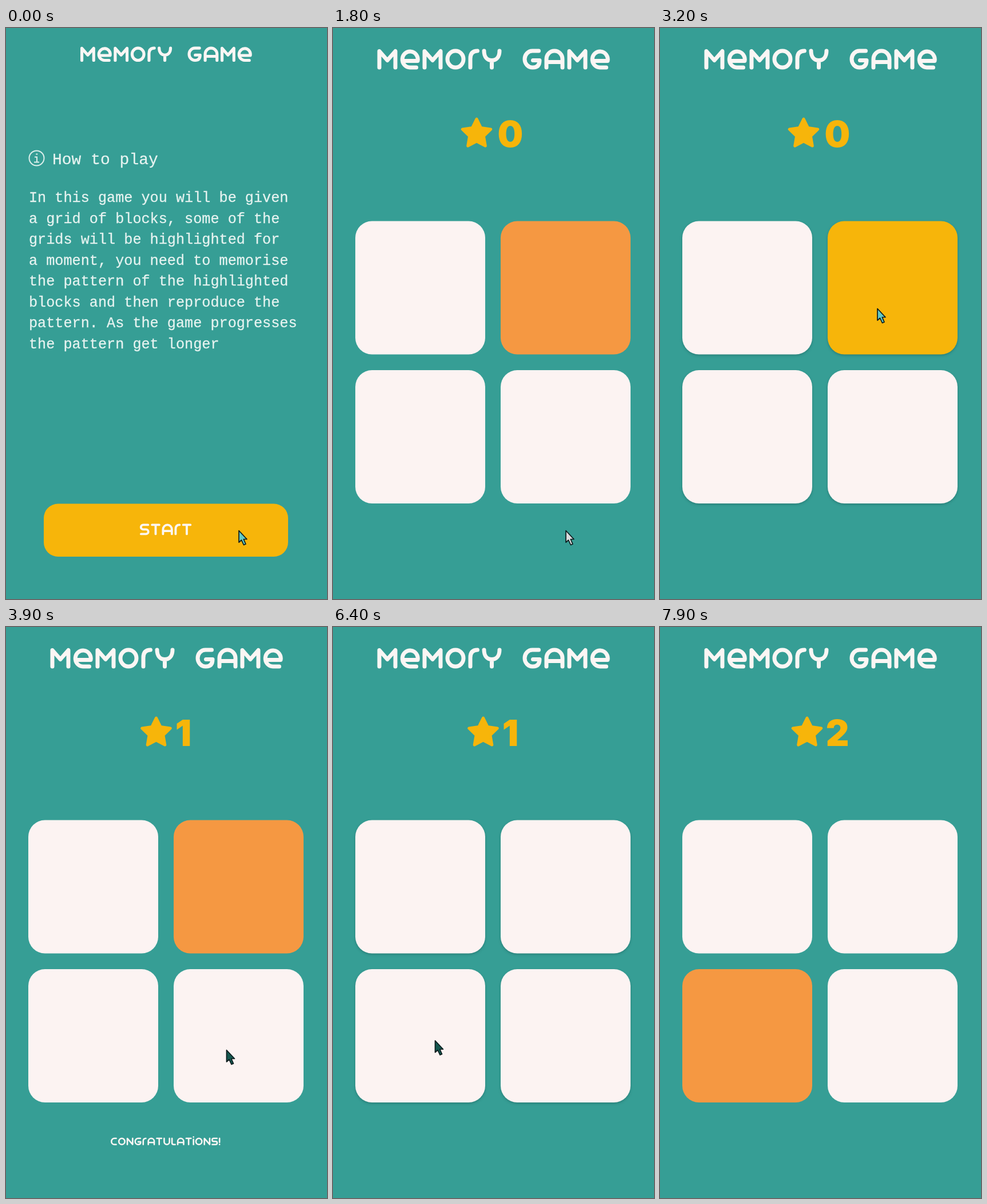
Write an HTML page that moves like this. It is 561x998 px and loops after 8000 ms.

```html
<!DOCTYPE html>
<html lang="en">
<head>
<meta charset="utf-8">
<title>Memory game</title>
<style>
html, body { margin: 0; height: 100%; overflow: hidden; background: #369e95; }
svg { display: block; width: 100%; height: 100%; }
.letters { fill: none; stroke: #fbf6f4; stroke-width: 7; stroke-linecap: round; stroke-linejoin: round; }
.mono { font-family: "Liberation Mono", monospace; fill: #e6f3f0; stroke: #e6f3f0; stroke-width: .3; white-space: pre; }
#score { font: 900 63px Inter, sans-serif; text-anchor: middle; }
.gold { fill: #f7b50a; stroke: #f7b50a; stroke-linejoin: round; }
</style>
</head>
<body>
<svg viewBox="0 0 561 998" preserveAspectRatio="none">
  <g id="intro">
    <g fill="none" stroke="#dcefeb" stroke-width="2">
      <circle cx="53.5" cy="227.5" r="13"/>
      <path d="M50 225.5h4v9M49 234.5h9M52.3 220.5h3"/>
    </g>
    <text class="mono" x="81" y="238" font-size="28">How to play</text>
    <g id="rules" class="mono" font-size="25.2"></g>
    <rect x="66" y="831.5" width="427" height="92.5" rx="25" fill="#f7b50a"/>
  </g>
  <g id="game">
    <path id="star" class="gold" stroke-width="5"/>
    <text id="score" class="gold" x="310" y="207.5" stroke-width="0"></text>
    <g id="tiles"></g>
  </g>
  <path id="cursor" d="M1 1V21.5L5.5 17.5L9.5 26L13 24.5L9.3 16H15Z" stroke="#0c1b1d" stroke-width="1.7" stroke-linejoin="round"/>
</svg>
<script>
const LOOP = 8000;
const $ = id => document.getElementById(id);
function add(parent, tag, attrs) {
  const el = document.createElementNS('http://www.w3.org/2000/svg', tag);
  for (const k in attrs) el.setAttribute(k, attrs[k]);
  return parent.appendChild(el);
}

// Rounded display lettering: [width, stroke path], 36 units high
const glyphs = {
  M: [35, 'M3.5 32.5V4L17.5 20L31.5 4V32.5'],
  E: [34, 'M4 21H30.5A13.5 14 0 1 0 17 32.5H28'],
  O: [35, 'M17.5 3.5A14 14.5 0 1 0 17.5 32.5A14 14.5 0 1 0 17.5 3.5'],
  R: [19, 'M3.5 32.5V17Q3.5 3.5 16 3.5'],
  Y: [34, 'M3.5 3.5C3.5 14 9 20 17 20S30.5 14 30.5 3.5M17 20V32.5'],
  G: [33, 'M28 3.5H17A13.5 14.5 0 0 0 17 32.5H18Q29.5 32.5 29.5 20H18'],
  A: [35, 'M3.5 32.5V18A14 14.5 0 0 1 31.5 18V32.5M3.5 23H31.5'],
  S: [30, 'M26 3.5H10.5A7.2 7.2 0 0 0 10.5 18H19.5A7.2 7.2 0 0 1 19.5 32.5H3.5'],
  T: [30, 'M3.5 3.5H26.5M15 3.5V32.5'],
  C: [30, 'M26 3.5H17A13.5 14.5 0 0 0 17 32.5H26'],
  N: [32, 'M3.5 32.5V4L28.5 32V3.5'],
  U: [32, 'M3.5 3.5V20A12.5 12.5 0 0 0 28.5 20V3.5'],
  L: [22, 'M3.5 3.5V25Q3.5 32.5 11 32.5H18.5'],
  I: [6, 'M3 8V32.5M3 -3V-2.5'],
  '!': [6, 'M3 3.5V22M3 32V32.5'],
  ' ': [27, '']
};
function lettering(parent, word, x, y, scale) {
  const g = add(parent, 'g', { class: 'letters', role: 'img', 'aria-label': word,
    transform: `translate(${x} ${y}) scale(${scale})` });
  let pen = 0;
  for (const ch of word.toUpperCase()) {
    const [width, d] = glyphs[ch];
    add(g, 'path', { d, transform: `translate(${pen})` });
    pen += width + 5;
  }
  return g;
}
lettering($('intro'), 'Memory Game', 130, 32.5, .738);
lettering($('intro'), 'Start', 234, 866.5, .55);
lettering($('game'), 'Memory Game', 77.5, 36.5, 1);
const praise = lettering($('game'), 'Congratulations!', 183, 892.5, .37);

['In this game you will be given', 'a grid of blocks, some of the', 'grids will be highlighted for',
 'a moment, you need to memorise', 'the pattern of the highlighted', 'blocks and then reproduce the',
 'pattern. As the game progresses', 'the pattern get longer'].forEach((line, i) => {
  add($('rules'), 'text', { x: 40, y: 304 + i * 36.5 }).textContent = line;
});

$('star').setAttribute('d', 'M' + Array.from({ length: 10 }, (_, i) => {
  const r = i % 2 ? 13 : 26, a = i * Math.PI / 5;
  return `${r * Math.sin(a)} ${-r * Math.cos(a)}`;
}).join('L') + 'Z');

const tiles = [0, 1, 2, 3].map(i => add($('tiles'), 'rect', {
  x: 39 + i % 2 * 254, y: 337.5 + (i >> 1) * 260.5, width: 227, height: 233, rx: 29 }));

// Times are [on, off]
const enabled = [[500, 1400], [2350, 3450], [5200, 6700]];
const flashes = { 1: [[1500, 2350], [3620, 4200], [6750, 7350]], 2: [[4600, 5200], [7600, 9000]] };
const taps = { 1: [[2950, 3300], [5950, 6150]], 2: [[6580, 6750]] };
const praises = [[3600, 4450], [6800, 7500]];
const presses = [[0, 500], [3000, 3350], [5950, 6150], [6600, 6850]];
// time, x, y of the pointer tip
const path = [[0, 406, 877.5], [2700, 406, 877.5], [3000, 379, 489.5], [3300, 379, 489.5],
  [3500, 384.5, 738.5], [5700, 384.5, 738.5], [5950, 379, 489.5], [6130, 379, 489.5],
  [6380, 177.5, 722], [6850, 177.5, 722], [7300, 190, 1010], [LOOP, 190, 1010]];

const clamp = v => Math.min(1, Math.max(0, v));
const level = (t, spans = []) =>
  spans.reduce((sum, [on, off]) => sum + clamp((t - on) / 200) - clamp((t - off) / 200), 0);
const mix = (a, b, k) => a.map((v, i) => v + (b[i] - v) * k);
const WHITE = [252, 243, 242], YELLOW = [247, 181, 10], ORANGE = [245, 152, 66];

function pointerAt(t) {
  const i = path.findIndex(p => p[0] > t), a = path[i - 1], b = path[i];
  const k = (t - a[0]) / (b[0] - a[0]);
  return mix(a, b, k * k * (3 - 2 * k)).slice(1);
}
function pointerColor(t) {
  if (presses.some(([on, off]) => t >= on && t < off)) return '#62c9c5';
  return t < 2700 ? '#d9dbdc' : '#15574f';
}

function draw(t) {
  const playing = t >= 500;
  $('intro').style.display = playing ? 'none' : '';
  $('game').style.display = playing ? '' : 'none';

  const points = t < 3600 ? 0 : t < 6800 ? 1 : 2;
  $('score').textContent = points;
  $('star').setAttribute('transform', `translate(${[251, 262.5, 257][points]} 185)`);

  tiles.forEach((tile, i) => {
    const c = mix(mix(WHITE, YELLOW, level(t, taps[i])), ORANGE, level(t, flashes[i]));
    tile.style.fill = `rgb(${c.map(Math.round)})`;
  });
  $('tiles').style.filter = `drop-shadow(0 2px 2px rgb(0 40 40 / ${.25 * level(t, enabled)}))`;
  praise.style.opacity = level(t, praises);

  $('cursor').setAttribute('transform', `translate(${pointerAt(t)})`);
  $('cursor').style.fill = pointerColor(t);
}

const start = performance.now();
function tick(now) {
  draw(Math.max(0, now - start) % LOOP);
  requestAnimationFrame(tick);
}
tick(start);
</script>
</body>
</html>
```
